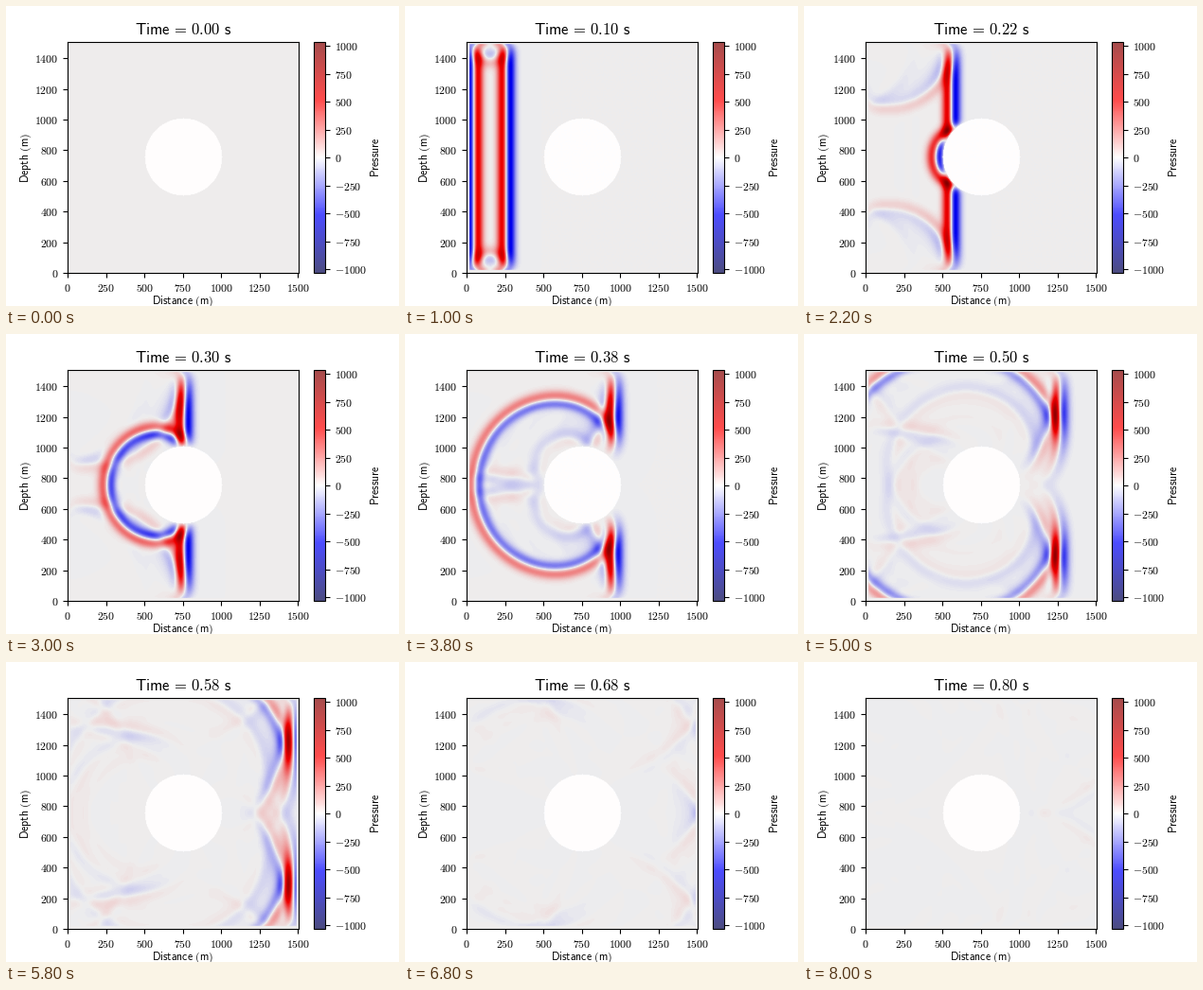
Write a matplotlib script that moves like this. It is 415 px wide and 317 px high and loops after 8.2 s.

```python
import numpy as np
import matplotlib.pyplot as plt
from matplotlib.animation import FuncAnimation
from matplotlib.cm import ScalarMappable
from matplotlib.colors import Normalize
from matplotlib.transforms import IdentityTransform

W, H, DPI = 415, 317, 100
FRAMES, INTERVAL = 41, 200

# Acoustic model: 301 x 301 cells of 5 m with a resting rim of 4 cells
N, RIM, DX = 301, 4, 5.0
SPEED, DT, STEPS = 2500.0, 0.001, 20
AMP, SIGMA, DELAY = 530.0, 0.0115, 0.058
SRC_COL, CENTRE, RADIUS = 30, 150, 50
LIMIT = 1035

plt.rcParams.update({
    "mathtext.fontset": "cm",
    "axes.unicode_minus": False,
    "xtick.labelsize": 8.5,
    "ytick.labelsize": 8.5,
    "axes.labelsize": 8.5,
    "axes.titlesize": 12,
})


def source_rate(t):
    """Time derivative of the antisymmetric source pulse."""
    u = (t - DELAY) / SIGMA
    return AMP / SIGMA * (1 - u**2) * np.exp(0.5 - u**2 / 2)


def absorb(new, old, ratio):
    """First-order absorbing condition on all four sides."""
    k = (ratio - 1) / (ratio + 1)
    for a, b in ((new, old), (new.T, old.T)):
        a[0] = b[1] + k * (a[1] - b[0])
        a[-1] = b[-2] + k * (a[-2] - b[-1])


def simulate():
    """Plane wave scattered by a pressure-free disc; one snapshot per frame."""
    offset = np.arange(N) - CENTRE
    rock = np.hypot(offset[:, None], offset) > RADIUS
    solid = rock[RIM:-RIM, RIM:-RIM]
    ratio = SPEED * DT / DX

    p = np.zeros(solid.shape)
    prev = p.copy()
    shots = []
    for step in range(FRAMES * STEPS):
        if step % STEPS == 0:
            shots.append(np.pad(p, RIM))
        new = 2 * p - prev
        new[1:-1, 1:-1] += ratio**2 * (p[2:, 1:-1] + p[:-2, 1:-1] + p[1:-1, 2:]
                                       + p[1:-1, :-2] - 4 * p[1:-1, 1:-1])
        new[1:-1, SRC_COL - RIM] += 2 * ratio * DT * source_rate(step * DT)
        absorb(new, p, ratio)
        prev, p = p, new * solid
    return shots, rock.astype(float)


def sans(text):
    return r"$\mathsf{" + text.replace(" ", r"\ ") + "}$"


def title(t):
    return rf"$\mathsf{{Time}}\,=\,\mathsf{{{t:.2f}\ s}}$"


def label(axis, text, x, y):
    """Axis label centred on a baseline point given in stage pixels."""
    axis.set_label_text(sans(text), ha="center", va="baseline")
    axis.set_label_coords(x, H - y, transform=IdentityTransform())


shots, rock = simulate()

fig, ax = plt.subplots(figsize=(W / DPI, H / DPI), dpi=DPI, facecolor="white")
norm = Normalize(-LIMIT, LIMIT)
area = dict(origin="lower", extent=(0, N * DX, 0, N * DX))
wave = ax.imshow(shots[0], cmap="seismic", norm=norm, **area)
ax.imshow(rock, cmap="gray_r", vmin=0, vmax=1, alpha=0.07, **area)
bar = fig.colorbar(ScalarMappable(norm, "seismic"), ax=ax, alpha=0.7,
                   ticks=range(-1000, 1001, 250))

ax.set_xticks(range(0, 1501, 250))
ax.set_yticks(range(0, 1401, 200))
for axis in (ax.xaxis, ax.yaxis, bar.ax.yaxis):
    axis.set_major_formatter("${x:.0f}$")
label(ax.xaxis, "Distance (m)", 186.5, 315.3)
label(ax.yaxis, "Depth (m)", 23.7, 160)
label(bar.ax.yaxis, "Pressure", 393.5, 160)
heading = ax.set_title(title(0))


def update(i):
    wave.set_data(shots[i])
    heading.set_text(title(i * 0.02))
    return wave, heading


anim = FuncAnimation(fig, update, frames=FRAMES, interval=INTERVAL,
                     repeat=True, repeat_delay=0, blit=False)
plt.show()
```
